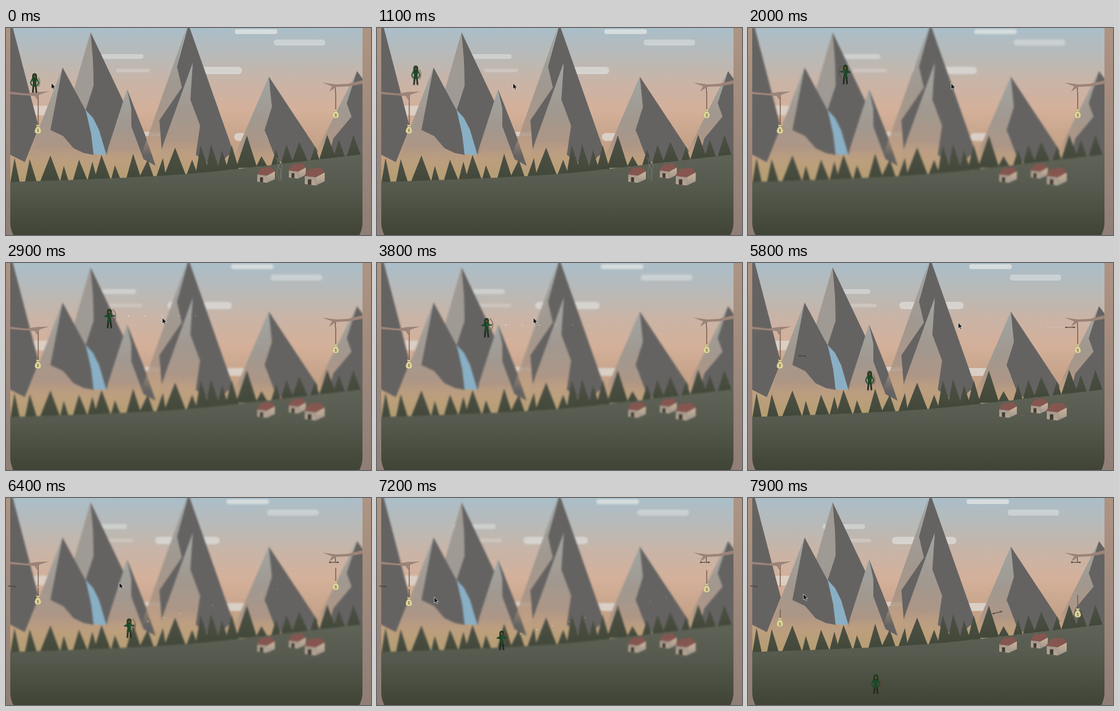
Recreate the animation shown at these times as an HTML page. Size 600x341 px, loop 8000 ms.

```html
<!DOCTYPE html>
<html lang="en">
<head>
<meta charset="utf-8">
<title>Archer</title>
<style>
html, body { margin: 0; width: 100%; height: 100%; overflow: hidden; background: linear-gradient(#ae9482, #8f7e77); }
svg { display: block; width: 600px; height: 341px; }

/* Every moving part shares one 8 s clock. */
.m { animation: 8s linear infinite; }
.s { animation: 8s step-end infinite; }

#scene { animation-name: focus; }
@keyframes focus {
  0%, 50%, 70%, 93.75% { filter: none; }
  23.75%, 52.5%, 73.125% { filter: blur(1.7px); }
}

.cloud { animation-name: drift; fill: #e4e7e5; }
@keyframes drift { to { translate: var(--d) 0; } }

#smoke { animation-name: smoke; }
@keyframes smoke { 0%, 11% { opacity: .75; } 23%, 100% { opacity: 0; } }

#archer { animation-name: fall; }
@keyframes fall {
  0%, 12.5% { translate: 47px 91px; }
  15% { translate: 80px 66px; }
  17.5% { translate: 108px 53px; }
  20% { translate: 132px 51px; }
  22.5% { translate: 150px 62px; }
  23.75% { translate: 158px 75px; }
  25% { translate: 160px 77px; }
  47.5% { translate: 180px 107px; }
  50% { translate: 182px 111px; }
  52.5% { translate: 185px 132px; }
  61.25% { translate: 191px 150px; }
  70% { translate: 197px 167px; }
  72.5% { translate: 200px 194px; }
  73.125% { translate: 200.5px 201px; }
  90% { translate: 205px 235px; }
  93.75% { translate: 206px 243px; }
  98.75% { translate: 210px 307px; }
  100% { translate: 211px 324px; }
}

#idle { animation-name: idle; }
#right { animation-name: right; }
#left { animation-name: left; }
#dots1 { animation-name: dots1; }
#dots2 { animation-name: dots2; }
#dots3 { animation-name: dots3; }
@keyframes idle { 0%, 50%, 70%, 93.75% { opacity: 1; } 23.75%, 52.5%, 73.125% { opacity: 0; } }
@keyframes right { 0%, 50%, 93.75% { opacity: 0; } 27.5%, 73.125% { opacity: 1; } }
@keyframes left { 0%, 27.5%, 70% { opacity: 0; } 23.75%, 52.5% { opacity: 1; } }
@keyframes dots1 { 0%, 50% { opacity: 0; } 27.5% { opacity: 1; } }
@keyframes dots2 { 0%, 70% { opacity: 0; } 52.5% { opacity: 1; } }
@keyframes dots3 { 0%, 93.75% { opacity: 0; } 73.125% { opacity: 1; } }

/* Arrows: origin is the tip. */
#shot1 { animation-name: shot1; }
#trail { animation-name: trail; }
#shot2 { animation-name: shot2; }
#shot3 { animation-name: shot3; }
@keyframes shot1 {
  0%, 49.99% { translate: 192px 103px; opacity: 0; }
  50% { translate: 192px 103px; opacity: 1; }
  52.5% { translate: 303px 103.5px; }
  61.25% { translate: 368px 104.5px; }
  70% { translate: 432px 105px; }
  72.5% { translate: 537px 106px; }
  72.75%, 100% { translate: 547px 106px; opacity: 1; }
}
@keyframes trail { 0% { opacity: .5; } 73% { opacity: 0; } }
@keyframes shot2 {
  0%, 69.99% { translate: 190px 162px; opacity: 0; }
  70% { translate: 190px 162px; opacity: 1; }
  72.5% { translate: 84px 152.5px; }
  73.125% { translate: 55px 149.5px; }
  80%, 100% { translate: 4px 145px; opacity: 1; }
}
@keyframes shot3 {
  0%, 93.74% { translate: 212px 238px; opacity: 0; }
  93.75% { translate: 212px 238px; opacity: 1; }
  98.75% { translate: 417px 187px; }
  100% { translate: 468px 174px; opacity: 1; }
}

#bagL { animation-name: dropL; }
#bagR { animation-name: dropR; }
@keyframes dropL {
  0%, 73.5% { translate: 0 0; }
  90% { translate: 0 4px; }
  93.75% { translate: 0 7px; }
  98.75% { translate: 0 38px; }
  100% { translate: 0 48px; }
}
@keyframes dropR {
  0%, 72.75% { translate: 0 0; }
  90% { translate: 0 7px; }
  93.75% { translate: 0 11px; }
  98.75% { translate: 0 48px; }
  100% { translate: 0 59px; }
}
#gap { animation-name: gap; }
@keyframes gap { 0% { opacity: 1; } 72.75% { opacity: 0; } }

#cursor { animation-name: point; }
@keyframes point {
  0%, 4% { translate: 74.5px 90.5px; }
  21%, 25% { translate: 334px 91px; }
  36%, 52.5% { translate: 257px 90px; }
  59%, 61.25% { translate: 346px 99px; }
  72.5%, 73.125% { translate: 345.5px 98px; }
  84%, 93.75% { translate: 94px 163px; }
  98.75%, 100% { translate: 91px 158px; }
}
</style>
</head>
<body>
<svg viewBox="0 0 600 341">
  <defs>
    <linearGradient id="sky" gradientUnits="userSpaceOnUse" x1="0" y1="0" x2="0" y2="250">
      <stop offset="0" stop-color="#aabec9"/>
      <stop offset=".2" stop-color="#bab9b6"/>
      <stop offset=".36" stop-color="#c9b4a6"/>
      <stop offset=".54" stop-color="#d4b09a"/>
      <stop offset=".75" stop-color="#c5a288"/>
      <stop offset="1" stop-color="#b49d72"/>
    </linearGradient>
    <linearGradient id="land" gradientUnits="userSpaceOnUse" x1="0" y1="210" x2="0" y2="341">
      <stop offset="0" stop-color="#5e6257"/>
      <stop offset=".4" stop-color="#565a4e"/>
      <stop offset="1" stop-color="#404436"/>
    </linearGradient>
    <linearGradient id="lit" x1="0" y1="0" x2="0" y2="1">
      <stop offset="0" stop-color="#a0a5a3"/>
      <stop offset=".5" stop-color="#a1988f"/>
      <stop offset=".8" stop-color="#ad9686"/>
      <stop offset="1" stop-color="#b99b7c" stop-opacity="0"/>
    </linearGradient>
    <linearGradient id="tree" x1="0" y1="0" x2="0" y2="1">
      <stop offset="0" stop-color="#4d5146"/>
      <stop offset="1" stop-color="#424839"/>
    </linearGradient>
    <linearGradient id="wall" x1="0" y1="0" x2="0" y2="1">
      <stop offset="0" stop-color="#a3968c"/>
      <stop offset="1" stop-color="#b9a691"/>
    </linearGradient>
    <linearGradient id="side" x1="0" y1="0" x2="0" y2="1">
      <stop offset="0" stop-color="#cfb69b"/>
      <stop offset="1" stop-color="#9c948c"/>
    </linearGradient>
    <linearGradient id="fade" gradientUnits="userSpaceOnUse" x1="30" y1="0" x2="380" y2="0">
      <stop offset="0" stop-color="#fff" stop-opacity=".95"/>
      <stop offset=".2" stop-color="#fff" stop-opacity=".45"/>
      <stop offset="1" stop-color="#fff" stop-opacity=".08"/>
    </linearGradient>
    <clipPath id="card"><rect x="7" y="-60" width="579" height="426" rx="46"/></clipPath>

    <g id="house">
      <path d="M1 12 17 14V26L1 24Z" fill="url(#wall)"/>
      <path d="M17 14 30 7V20L17 26Z" fill="url(#side)"/>
      <path d="M0 12 7 2 24 0 30 7 17 14Z" fill="#85564f"/>
      <path d="M5.500 17H10.500V25L5.500 24.500Z" fill="#3f3c35"/>
    </g>

    <g id="arrow" fill="none" stroke="#3b3029">
      <path d="M0 0H-16" stroke-width="1"/>
      <path d="M-16 -1 -13 0-16 1M-3 -1 0 0-3 1" stroke-width=".7"/>
    </g>

    <g id="bag">
      <path d="M-1.700 -5.500C-6.500 0 -6.500 6 0 6S6.500 0 1.700 -5.500L3 -9 0 -8 -3 -9Z" fill="#e0d8a0" stroke="#a79c62" stroke-width=".4"/>
      <path d="M-2 -5.500H2" stroke="#8b7a4a" stroke-width=".8"/>
      <text y="3.400" text-anchor="middle" font-family="'Liberation Sans', sans-serif" font-size="6.5" font-weight="bold" fill="#7a6e3d">$</text>
    </g>

    <g id="figure">
      <path d="M-1.700 3-3 15.500M1.700 3 3 15.500" fill="none" stroke="#20291f" stroke-width="2.6"/>
      <path d="M-4.500 -8H4.500L2.800 0 4 5.500H-4L-2.800 0Z" fill="#1c4729"/>
      <path d="M-3 1H3" stroke="#3e3a20"/>
      <path d="M-3.800 -8Q-5 -16.500 0 -16.500T3.800 -8Z" fill="#16361f"/>
      <ellipse cy="-11.500" rx="1.900" ry="2.500" fill="#80592f"/>
      <path d="M-2 -12H2" stroke="#20301c" stroke-width=".8"/>
    </g>

    <g id="aim" fill="none">
      <use href="#figure"/>
      <path d="M0 -5H9M-3 -6-8 -4-3 -4" stroke="#1c4729" stroke-width="2.2"/>
      <path d="M6 -16Q15 -5 6 5" stroke="#69472b"/>
      <path d="M6 -16 1 -5 6 5" stroke="#8d8064" stroke-width=".4"/>
    </g>

    <path id="dots" d="M31.5 0H400" fill="none" stroke="url(#fade)" stroke-width="1.7" stroke-linecap="round" stroke-dasharray="0 27.5"/>
  </defs>

  <g clip-path="url(#card)">
    <g id="scene" class="s">
      <path d="M-30 -30H630V380H-30Z" fill="url(#sky)"/>
      <g id="clouds"></g>

      <g id="mountains" fill="#656362">
        <path d="M-20 -30H3.500L54 164 31 221-20 195Z"/>

        <path d="M139 7 107 118 131 136 144 95 143 55Z" fill="#a09a94"/>
        <path d="M139 7 202 140 165 210 131 135 144 95 143 55Z"/>

        <path d="M93 65 30 228H165L142 200 93 175 80 150Z" fill="url(#lit)"/>
        <path d="M93 65 131 136 142 170 144 209 128 206 111 198 94 178 73 168Z"/>
        <path d="M131 135 143 148 153 168 165 209 144 208 140 175Z" fill="#89afc5"/>

        <path d="M199 101 160 222H234L214 172 212 135Z" fill="url(#lit)"/>
        <path d="M199 101 229 177 246 227 226 216 206 162 206 133Z"/>

        <path d="M298 -4 222 210H262L256 200 252 152 289 98 281 64Z" fill="url(#lit)"/>
        <path d="M300 -6 374 205 340 225 307 60 256 201 252 152 289 98 281 64Z"/>
        <path d="M307 57 249 218H316L319 161 303 118Z" fill="url(#lit)"/>
        <path d="M307 57 366 208 346 232 312 209 319 161 303 118Z"/>

        <path d="M432 80 370 224H445L425 168 437 130Z" fill="url(#lit)"/>
        <path d="M432 80 513 203 500 220H445L425 168 437 130Z"/>

        <path d="M577 71 506 212H530L568 146 560 124Z" fill="url(#lit)"/>
        <path d="M577 71 620 130V220H528L538 182 568 146 560 124Z"/>
      </g>

      <g id="trees" fill="url(#tree)"></g>
      <path d="M-30 255C150 249 220 246 290 241S480 220 630 203V380H-30Z" fill="url(#land)"/>

      <use href="#house" x="412" y="229"/>
      <use href="#house" transform="translate(464 223) scale(.96)"/>
      <use href="#house" transform="translate(490 230) scale(1.13)"/>
      <path d="M448 250H454V252H448Z" fill="#6f5b49"/>
      <g id="smoke" class="m" fill="none" stroke="#858b85" stroke-width=".9">
        <path d="M449 250Q442 236 448 227T443 214"/>
        <path d="M451 250Q455 238 449 230T449 212"/>
        <path d="M452 250Q449 240 453 232T447 219"/>
      </g>
    </g>
  </g>

  <g stroke="#6d5747" stroke-width="1.3" fill="none">
    <path d="M53 110V146"/>
    <path d="M541.5 95V106"/>
    <path id="gap" class="s" d="M542 106V112"/>
  </g>
  <g id="bagL" class="m">
    <path d="M53 146V160" stroke="#6d5747" stroke-width="1.3"/>
    <use href="#bag" x="52.5" y="168"/>
  </g>
  <g id="bagR" class="m">
    <path d="M542 112V134" stroke="#6d5747" stroke-width="1.3"/>
    <use href="#bag" x="542" y="142.5"/>
  </g>
  <path d="M7 105 34 108 50 105.500 71 104.500 57 109 51 112 54 122 47 112 34 111 7 109Z" fill="#9a8378"/>
  <path d="M586 86 562 92 543 93 520 90 536 96 531 105 543 97 564 96 586 92Z" fill="#9c8377"/>

  <g id="shot1" class="m">
    <path id="trail" class="s" d="M-16 0H-47" stroke="#dccdbd" stroke-width=".9"/>
    <use href="#arrow"/>
  </g>
  <g id="shot2" class="m"><use href="#arrow" transform="rotate(185) scale(.7 1)"/></g>
  <g id="shot3" class="m"><use href="#arrow" transform="rotate(-14)"/></g>

  <g id="archer" class="m">
    <g id="dots1" class="s"><use href="#dots" y="-5"/></g>
    <g id="dots2" class="s"><use href="#dots" transform="translate(0 -6) scale(-1 1) rotate(-5.300)"/></g>
    <g id="dots3" class="s"><use href="#dots" transform="translate(0 -4) rotate(-14)"/></g>
    <g id="idle" class="s" fill="none">
      <path d="M6 -10Q11 -1 6 6" stroke="#604528" stroke-width=".9"/>
      <use href="#figure"/>
      <path d="M-4 -7-6.500 -1-4.500 4M4 -7 6.500 -1 4.500 4" stroke="#1c4729" stroke-width="1.900"/>
    </g>
    <g id="right" class="s"><use href="#aim"/></g>
    <g id="left" class="s"><use href="#aim" transform="scale(-1 1)"/></g>
  </g>

  <path id="cursor" class="m" d="M0 0V10L2.300 8 4 11.500 5.600 10.700 4 7.500H7Z" fill="#111" stroke="#eee" stroke-width=".7"/>
</svg>

<script>
const NS = "http://www.w3.org/2000/svg";
function add(id, tag, attrs) {
  const el = document.createElementNS(NS, tag);
  for (const key in attrs) el.setAttribute(key, attrs[key]);
  document.getElementById(id).append(el);
}

// x, y, width, height, opacity, drift over one loop
const clouds = [
  [376, 2, 70, 8, .75, -17], [440, 19, 85, 10, .5, -13.5],
  [156, 43, 70, 8, .5, -34], [181, 67, 56, 6, .3, -35],
  [282, 64, 106, 12, .6, -46], [375, 173, 110, 13, .65, -40],
  [20, 128, 100, 16, .55, -8], [215, 171, 45, 7, .6, -4]
];
for (const [x, y, width, height, opacity, d] of clouds)
  add("clouds", "rect", { class: "cloud m", x, y, width, height, rx: height / 2, opacity, style: `--d:${d}px` });

const ground = x => x < 290 ? 254 - (x - 7) * .046 : 241 - (x - 290) * .11;

// left foot, apex x, apex y, right foot
const trees = [
  [7, 14, 214, 23], [31, 39, 216, 51], [56, 73, 210, 89], [89, 95, 227, 103],
  [110, 120, 217, 134], [134, 142, 220, 150], [145, 157, 209, 172], [173, 179, 226, 188],
  [198, 209, 207, 222], [219, 233, 217, 243], [247, 258, 214, 263], [260, 278, 197, 296],
  [297, 306, 217, 315], [312, 320, 193, 335], [328, 337, 191, 352], [347, 355, 201, 366],
  [361, 371, 193, 383], [378, 396, 177, 413], [411, 420, 211, 430], [436, 444, 200, 452],
  [452, 461, 192, 473], [470, 482, 187, 497], [500, 508, 195, 516], [515, 528, 176, 543],
  [538, 547, 184, 558], [560, 571, 176, 584]
];
for (const [left, x, y, right] of trees)
  add("trees", "path", { d: `M${x} ${y}L${right} ${ground(right) + 3}H${left}Z` });
</script>
</body>
</html>
```
